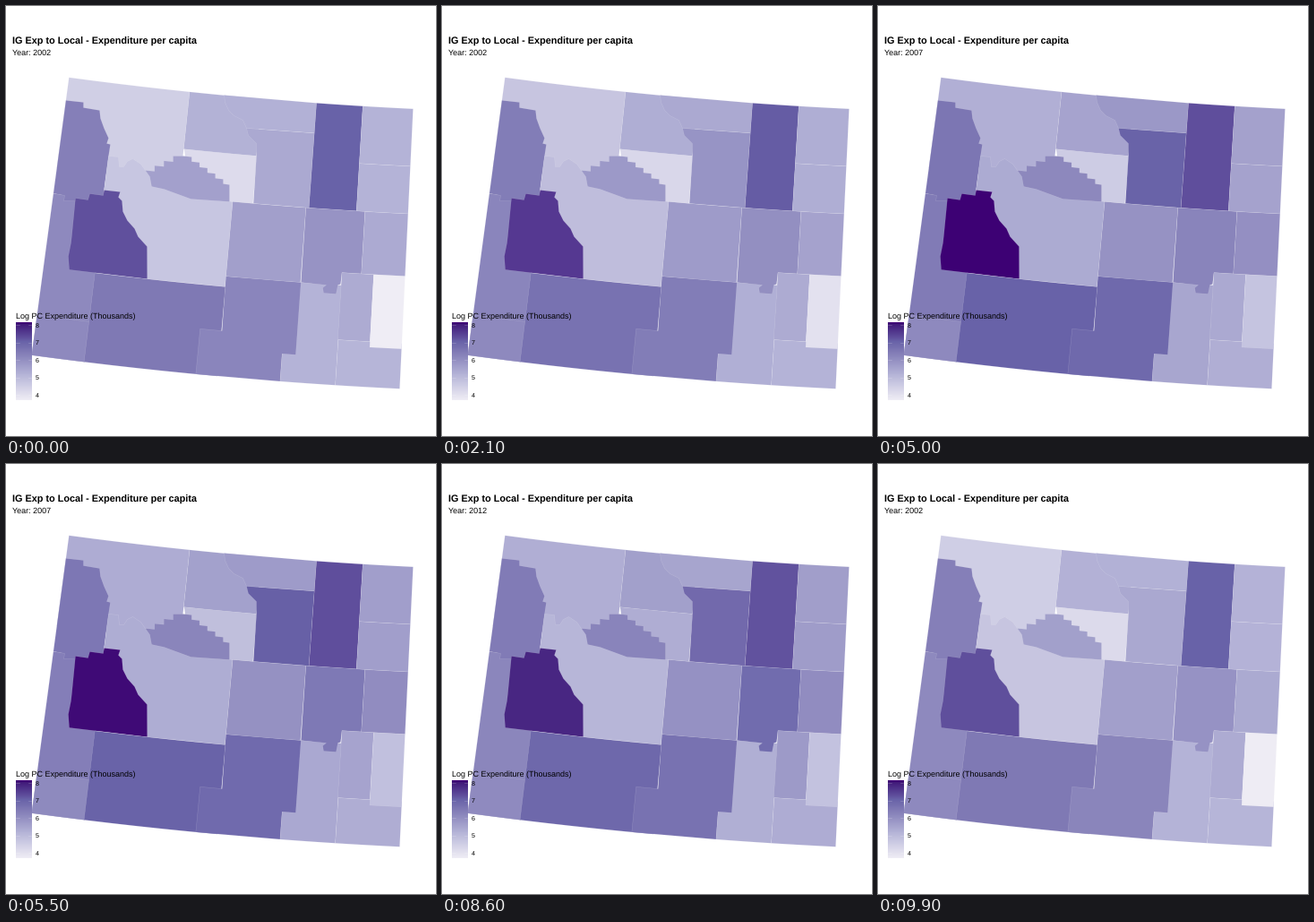
Recreate the animation shown at these times as a matplotlib script. Size 480 by 480 pixels, loop 10000 ms.

```python
import numpy as np
import matplotlib.pyplot as plt
from matplotlib.animation import FuncAnimation
from matplotlib.colors import to_rgb
from matplotlib.patches import Polygon

SIZE, DPI, FRAMES = 480, 100, 100
PX = 72 / DPI  # points per pixel
WEST, EAST, SOUTH, NORTH = -111.05, -104.05, 41, 45
STOPS = ["#3d0074", "#421c7b", "#60509d", "#6862a8", "#807ab5", "#b4b3d7", "#efedf5"]

plt.rcParams["font.family"] = ["Liberation Sans", "DejaVu Sans"]
plt.rcParams["text.hinting"] = "none"

fig = plt.figure(figsize=(SIZE / DPI, SIZE / DPI), dpi=DPI, facecolor="white")
ax = fig.add_axes([0, 0, 1, 1])
ax.axis("off")


def ramp(red):
    """Purple shade with the given red level (61 dark to 239 light)."""
    stops = np.array([to_rgb(c) for c in STOPS])
    red = np.asarray(red) / 255
    return np.stack([np.interp(red, stops[:, 0], stops[:, i]) for i in range(3)], -1)


def place(lon, lat):
    """Conic projection to stage pixels."""
    angle = np.radians(7.67 - 0.703 * (lon - WEST))
    radius = 4492.3 + 78.2 * (NORTH - lat)
    return 669.4 - radius * np.sin(angle), radius * np.cos(angle) - 4372.8


def places(*corners):
    return [place(*corner) for corner in corners]


def block(west, south, east, north):
    lons = np.linspace(west, east, 6)
    return [place(x, north) for x in lons] + [place(x, south) for x in lons[::-1]]


def stairs(start, end, steps):
    xs = np.linspace(start[0], end[0], steps + 1)
    ys = np.linspace(start[1], end[1], steps + 1)
    points = [start]
    for i in range(steps):
        points += [(xs[i + 1], ys[i] + 1), (xs[i + 1], ys[i + 1])]
    return points


shapes, shades = [], []


def county(outline, *levels):
    """Add a county with its shade in 2002, 2007 and 2012."""
    shape = Polygon(np.array(outline) + 0.5, edgecolor=(1, 1, 1, 0.2),
                    linewidth=0.5 * PX, joinstyle="round")
    shapes.append(ax.add_patch(shape))
    shades.append(ramp(levels))


# Counties overlap: later ones cut the shared borders of earlier ones
# West
county(block(WEST, SOUTH, -110.04, 43.33), 142, 129, 138)
county(block(WEST, SOUTH, -110.04, 41.58), 142, 142, 143)
county(block(WEST, 43.7, -108.59, NORTH), 208, 177, 168)
county([place(WEST, 44.67), (86, 107), (86, 113), (104, 116), (105, 125), (109, 136),
        (114, 147), (112, 153), (116, 154), (114, 167), (109, 205), (108, 218),
        (64, 217), (65, 211), place(WEST, 43.33)], 133, 124, 128)

# Centre
county([(114, 167), (125, 168), (126, 179), (131, 179), (135, 173), (141, 170),
        (150, 176), (155, 183)]
       + places((-107.52, 43.5), (-107.52, 42.28), (-109.03, 42.28))
       + [(109, 205)], 199, 172, 179)
county([(77, 214), (91, 216), (93, 209), (108, 211), (109, 205), (127, 207),
        (125, 213), (129, 217), (130, 229), (135, 239), (143, 248), (147, 257),
        (157, 268)]
       + places((-109.03, 42.28), (-110.55, 42.28))
       + [(69, 279), (72, 264), (73, 255)], 96, 61, 66)
county(places((-108.58, 44.18), (-107.12, 44.18), (-107.12, 43.5)) + [(206, 214)],
       221, 207, 164)
county(stairs((155, 183), (186, 167), 3) + stairs((198, 167), (242, 198), 5)
       + [(249, 199), (249, 218), (206, 215), (176, 204), (162, 201), (160, 190)],
       163, 141, 131)
county(block(-107.52, 42.43, -106.07, 43.5), 162, 150, 146)

# North
county(block(-108.59, 44.18, -107.13, NORTH), 179, 166, 158)
county([(243, 99), (244, 107), (248, 116), (254, 122), (264, 127), (268, 136)]
       + places((-106.01, 44.57), (-106.01, NORTH)), 178, 155, 164)
county([(268, 136)]
       + places((-106.01, 44.57), (-106.01, 43.5), (-107.11, 43.5), (-107.13, 44.18))
       + [(279, 153), (270, 144)], 171, 105, 100)
county(block(-106.01, 43.5, -105.07, NORTH), 104, 95, 95)
county(block(-105.07, 44.18, EAST, NORTH), 180, 164, 156)
county(block(-105.07, 43.5, EAST, 44.18), 180, 165, 154)

# South
county(block(-110.05, SOUTH, -107.51, 42.28), 127, 104, 106)
county(block(-106.32, SOUTH, -105.27, 42.43), 180, 168, 175)
county(places((-107.52, 42.43), (-106.06, 42.43), (-106.06, 41.395), (-106.32, 41.395),
              (-106.32, SOUTH), (-107.92, SOUTH), (-107.92, 41.65), (-107.5, 41.65)),
       138, 111, 115)

# East
county(block(-105.27, SOUTH, EAST, 41.65), 182, 176, 172)
county(block(-105.28, 41.65, -104.66, 42.61), 173, 172, 153)
county(block(-104.66, 41.57, EAST, 42.61), 239, 198, 184)
county(places((-106.07, 43.5), (-104.9, 43.5), (-104.9, 42.61), (-105.28, 42.61))
       + [(373, 310), (370, 311), (368, 321), (354, 320), (353, 314), (357, 311),
          place(-106.06, 42.43)], 151, 138, 104)
county(block(-104.9, 42.61, EAST, 43.5), 172, 148, 138)
shades = np.array(shades)


def label(x, y, text, size, **style):
    return ax.text(x, y, text, fontsize=size * PX, color="black", va="baseline",
                   zorder=5, **style)


label(7, 42.4, "IG Exp to Local - Expenditure per capita", 10.85, weight="bold")
year = label(6.8, 55, "", 9)

# Legend
label(11, 349, "Log PC Expenditure (Thousands)", 9)
bar = ramp(np.linspace(61, 239, 87))[:, None, :]
ax.imshow(bar, extent=(11, 28.3, 439.7, 353.3), aspect="auto",
          interpolation="bilinear", zorder=4)
for value in range(4, 9):
    y = 434 - 19.5 * (value - 4)
    label(32.7, y + 2.6, str(value), 7.2)
    for x in (11, 24.8):
        ax.plot([x, x + 3.5], [y, y], color="white", lw=0.5 * PX, alpha=0.35, zorder=5)

ax.set_xlim(0, SIZE)
ax.set_ylim(SIZE, 0)


def draw(n):
    # Each year holds for a sixth of the loop, then blends for a sixth
    time = (n + 0.68) * 6 / FRAMES
    now = int(time // 2) % 3
    after = (now + 1) % 3
    mix = max(0, time % 2 - 1)
    for shape, shade in zip(shapes, shades):
        shape.set_facecolor(shade[now] * (1 - mix) + shade[after] * mix)
    year.set_text(f"Year: {2002 + 5 * (after if mix > 0.55 else now)}")
    return shapes + [year]


anim = FuncAnimation(fig, draw, frames=FRAMES, interval=100, repeat=True, repeat_delay=0)
plt.show()
```
